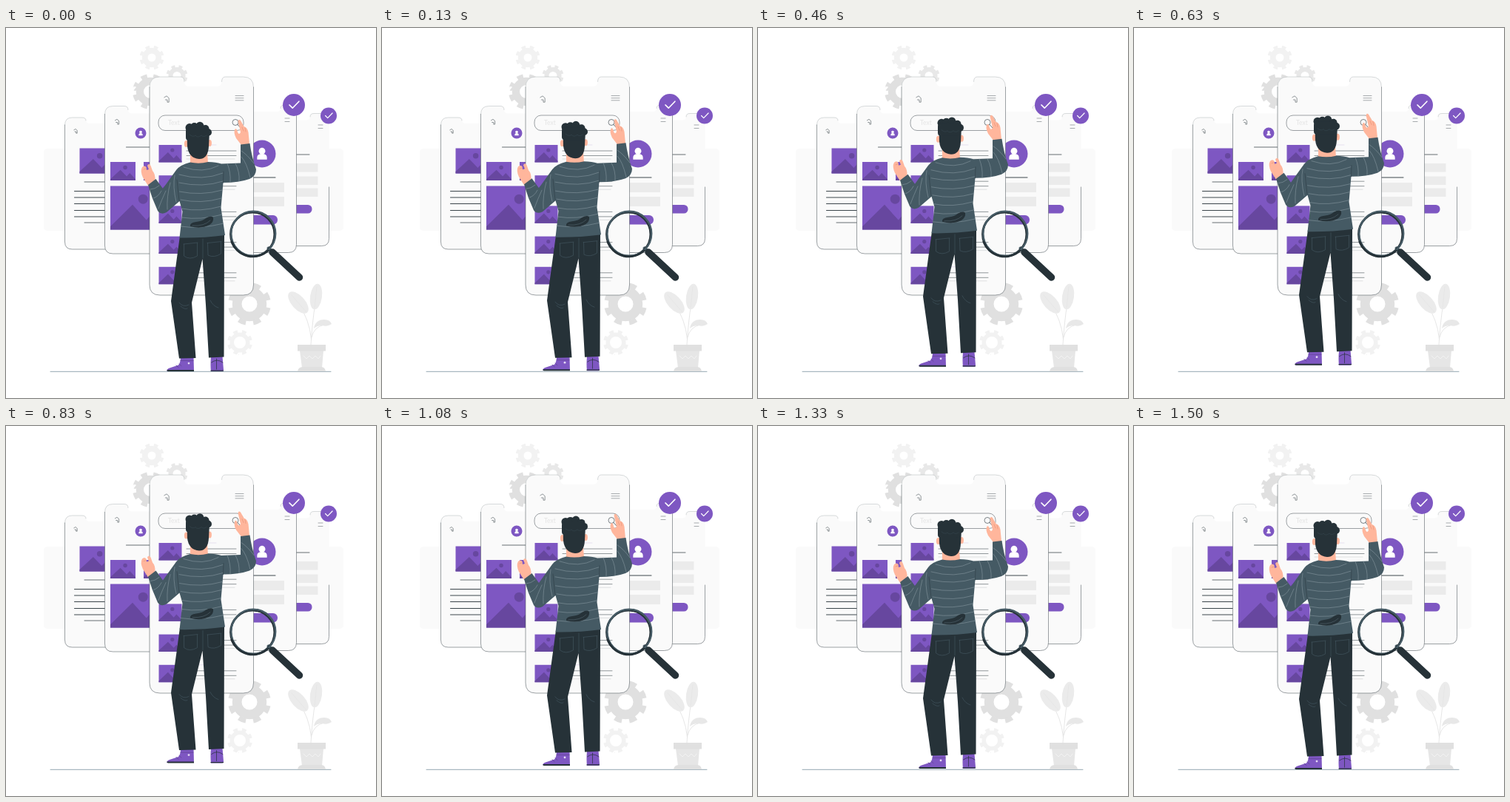
Write an HTML page that moves like this. It is 500x500 px and loops after 1540 ms.

```html
<!DOCTYPE html>
<html lang="en">
<head>
<meta charset="utf-8">
<style>
  html, body { margin: 0; width: 100%; height: 100%; overflow: hidden; background: #fff; }
  svg { display: block; width: 100%; height: 100%; }
</style>
</head>
<body>
<svg id="stage" viewBox="0 0 500 500"></svg>
<script>
const DARK = '#263238', SLATE = '#455a64', PURPLE = '#7e57c2', SHADE = '#67479f', SKIN = '#ffb69c';
const LOOP = 1540;

const path = (d, fill, extra = '') => `<path d="${d}" fill="${fill}" ${extra}/>`;
const line = (d, color = DARK, width = .7) =>
  path(d, 'none', `stroke="${color}" stroke-width="${width}" stroke-linecap="round" stroke-linejoin="round"`);
const rect = (x, y, w, h, fill, r = 0) =>
  `<rect x="${x}" y="${y}" width="${w}" height="${h}" rx="${r}" fill="${fill}"/>`;
const circle = (x, y, r, fill, extra = '') => `<circle cx="${x}" cy="${y}" r="${r}" fill="${fill}" ${extra}/>`;
const rows = (ys, x1, x2, color, width) => line(ys.map(y => `M${x1} ${y}H${x2}`).join(''), color, width);

function gear(x, y, r, hole, color, teeth = 8) {
  const tooth = r * .2, rim = r - tooth, mid = (rim + hole) / 2;
  return circle(x, y, mid, 'none', `stroke="${color}" stroke-width="${rim - hole}"`) +
    circle(x, y, r - tooth / 2 - .5, 'none',
      `stroke="${color}" stroke-width="${tooth + 1}" pathLength="${teeth * 2}" stroke-dasharray="1" transform="rotate(11 ${x} ${y})"`);
}

// Phone body with a notch in the top edge between n1 and n2; the outline leaves the notch open
function phone(x1, x2, top, bottom, n1, n2, depth, r, edgeTop = top + r) {
  const low = top + depth, mid = top + depth / 2;
  const left = `M${n1} ${mid}Q${n1} ${top} ${n1 - 5} ${top}H${x1 + r}Q${x1} ${top} ${x1} ${top + r}`;
  const base = `V${bottom - r}Q${x1} ${bottom} ${x1 + r} ${bottom}H${x2 - r}Q${x2} ${bottom} ${x2} ${bottom - r}`;
  const right = `Q${x2} ${top} ${x2 - r} ${top}H${n2 + 5}Q${n2} ${top} ${n2} ${mid}`;
  return path(`${left}${base}V${top + r}${right}Q${n2} ${low} ${n2 - 6} ${low}H${n1 + 6}Q${n1} ${low} ${n1} ${mid}Z`, '#fafafa') +
    line(left + right.replace(/^Q/, `M${x2} ${top + r}Q`), '#a9aeb1', .45) +
    line(`M${x1} ${top + r}${base}V${edgeTop}`, '#4b555a', .55);
}

// Picture placeholder: hills and a sun
function tile(x, y, w, h) {
  const at = (u, v) => `${x + w * u} ${y + h * v}`;
  return rect(x, y, w, h, PURPLE) + circle(x + w * .59, y + h * .3, Math.min(w, h) * .11, SHADE) +
    path(`M${at(0, 1)}V${y + h * .93}L${at(.4, .43)}L${at(.65, .78)}L${at(.77, .6)}L${at(1, .93)}V${y + h}Z`, SHADE);
}

function avatar(x, y, r) {
  return circle(x, y, r, PURPLE) + circle(x, y - r * .2, r * .24, '#fff') +
    path(`M${x - r * .36} ${y + r * .42}V${y + r * .25}Q${x - r * .34} ${y} ${x} ${y}
      Q${x + r * .34} ${y} ${x + r * .36} ${y + r * .25}V${y + r * .42}Z`, '#fff');
}

const badge = (x, y, r) => circle(x, y, r, PURPLE) +
  line(`M${x - r * .4} ${y}l${r * .28} ${r * .28}l${r * .58} ${-r * .6}`, '#fff', r * .11);
const home = (x, y, s) => line(`M${x - s} ${y - s}l${s} ${-s * .6}q${s} ${s * .7} ${s} ${s}V${y + s}h${-s * .7}v${-s}h${-s * .8}`, DARK, .5);

const scenery =
  rect(51, 163, 50, 111, '#fafafa', 5) + rect(410, 163, 46, 111, '#fafafa', 5) +
  gear(197, 40, 16.5, 5.5, '#f2f2f2') + gear(231, 64.5, 14.5, 5.5, '#e8e8e8') + gear(195, 86, 24, 9, '#e0e0e0') +
  gear(329, 373, 29, 10.5, '#e0e0e0') + gear(316, 425, 17, 8, '#f2f2f2') +
  line('M60 464.3H439', '#78909c', .8);

const leftPhones =
  phone(79.5, 170, 121, 299, 108, 150, 8, 10) + home(94, 140, 2.2) + tile(99.5, 162.5, 46, 34) +
  rows([208, 263], 106, 134) + rows([220.5, 229, 237.5, 246.5, 255], 92.5, 134, DARK, .9) +
  phone(133.5, 230, 105.5, 305, 165, 210, 10, 11) + home(150, 127.5, 2.6) + avatar(182, 142, 7.5) +
  rows([161], 162.5, 194) + tile(141, 181, 34, 25) + tile(186, 181, 34, 25) + tile(141, 213.5, 75, 59);

const rightPhones =
  phone(350, 436.5, 115.5, 294.5, 365, 411, 9, 10, 215) + rows([131, 135.5], 422, 428, DARK, .4) +
  rows([171], 392, 410) + [183, 200.5, 216.5].map(y => rect(380, y, 41.5, 11.5, '#ebebeb')).join('') +
  rect(370, 239, 43.5, 11.5, PURPLE, 5.5) +
  phone(300, 392.5, 104, 303.5, 310, 371, 9, 11) + rows([122, 126.5], 377, 383, DARK, .4) +
  avatar(346, 170, 18.5) + rows([202], 320, 364, DARK, .9) +
  rect(320, 209, 56, 13, '#ebebeb') + rect(320, 228, 56, 13, '#ebebeb') + rect(310, 253, 57, 12.5, PURPLE, 6) +
  badge(389, 104, 15) + badge(436, 118.5, 11);

const mainPhone =
  phone(194, 334.5, 66, 361, 241, 291.5, 13, 14) + home(217, 97, 3.2) + rows([91.5, 94.7, 97.8], 310, 321, DARK, .4) +
  `<rect x="206" y="118" width="115" height="20.5" rx="9" fill="#fafafa" stroke="#5b6468" stroke-width=".6"/>
  <text x="219" y="131" font-family="Lato, sans-serif" font-size="8.5" fill="#e4e4e4">Text</text>` +
  circle(310, 127.5, 4, 'none', `stroke="${DARK}" stroke-width=".6"`) + line('M313 130.5L317 135') +
  [158, 199.2, 240.4, 281.6, 322.8].map(y => tile(206.5, y, 31, 23.4) + rows([y], 246, 284, '#ddd6ea', .7) +
    rows([y + 8, y + 14.5], 244, 311, DARK, .5) + rows([y + 19], 244, 309, '#b0b5b8', .4)).join('');

const plant =
  line('M412 428Q414 396 418 372M412.5 420Q410 394 395 372M413 418Q416 404 430 401', '#e0e0e0', .8) +
  `<g fill="#ebebeb"><ellipse cx="395" cy="371" rx="9" ry="18" transform="rotate(-42 395 371)"/>
  <ellipse cx="419" cy="363" rx="8" ry="17.5" transform="rotate(8 419 363)"/></g>` +
  path('M416 406Q418 394 430 394Q438 394 440 400Q434 404 428 402Q420 402 416 406Z', '#e8e8e8') +
  line('M406 384L386 361M417 378L420 350', '#e0e0e0', .5) +
  path('M397 436H429L427 459H400Z', '#e6e6e6') + rect(394, 428, 38, 8.5, '#e0e0e0') +
  path('M394 464Q395 458 401 458H426Q431 458 432 464Z', '#e0e0e0') +
  line('M402 443l4 4 4-4 4 4 4-4 4 4 3-4', '#f5f5f5', .8);

const magnifier =
  line('M355 298L361 304', SLATE, 5) + line('M360 303L396.5 337', DARK, 9.5) +
  circle(333.3, 278.8, 29.7, 'none', `stroke="${DARK}" stroke-width="3"`) +
  circle(334.2, 277.8, 30, 'none', `stroke="${SLATE}" stroke-width="2.4"`) +
  line('M305 289A30.5 30.5 0 0 0 354 301', DARK, 3);

const shoes =
  path('M236 445H253.5L254 463.5H217.5Q217 461 221 459.5L233 455.5Q236 452 236 445Z', PURPLE) +
  path('M217.5 462Q217 464 219 464H254V462Z', DARK) + line('M236 449.5H253M230 456l3 2.5M234 454l3 2.5', SHADE, 1) +
  circle(247, 453, 1.4, '#e6dcf5') +
  path('M277 444H292.5L294 462Q294 464 291 464H277Q276 456 277 444Z', PURPLE) +
  line('M277 463H293.5', DARK, 1.3) + line('M284.5 447V461M277.5 452Q285 446 293 452', DARK, .7);

const trousers =
  path('M235 281L295 279L294.5 444.5L274 445.5L270 374L265.5 312L251 371L256.5 446L234 446.5L223 369Z', DARK) +
  line(`M240.5 292L240.5 308Q248 314 258.5 308V290.5M272.5 290.5L273 307Q281 311 290.5 305V289
    M240 292L259 290M272 290.5L291 288.5M234 371Q239 378 247 374M236 376Q242 381 245 379
    M276 368Q280 376 287 378M266 285V311`, SLATE, .6);

const stripes = `M240 188Q266 197 287 186M234 198Q265 207 293 196M234 209Q266 216 293 207M234.5 221Q264 227 292 219
  M236 232Q264 238 291 230M238 244Q262 249 290.5 241M238 256Q262 260 292 252M236 268Q262 272 294 264
  M299 183Q304 195 303 208M310 183Q316 194 315 207M318 174Q325 181 330 202M318 166Q326 171 335 183
  M195 218Q201 218 207 213M199 230Q206 228 210 220M206 244Q210 233 216 220M218 245Q217 228 222 209M230 235Q225 214 228 199`;

const man =
  shoes + trousers +
  path('M192 213L185 202Q181 193 184 188Q187 185 189.500 188L190 192L193 191L191 186Q193 182 195.500 186L198 193Q202 197 201.500 206Z', SKIN) +
  path('M318 158L311 149Q307 141 309.500 136.500Q312 135 313 141Q315 145 317 141L313.500 126Q314.500 122.500 317 125L321.500 133Q326 134 327.500 141L329 157Z', SKIN) +
  line('M186 191L189 190M319 134l2 5M323 135l1 5', '#e58f73', .6) +
  path('M249 168H272L273 183Q261 188 249 183Z', SKIN) +
  path(`M249 181.500Q261 184 273 181Q284 181 291 183.500L317 182.500L317 157.500L329.500 156Q332 174 338 191Q338 200 329 204
    Q315 209 293.500 209L290.500 243L296 280Q266 284 234.500 283.500L238.500 248L234.500 234L217 249Q209 253 205 247Q197 230 192 212
    L202.500 204L212 217L230 192Q235 185 249 181.500Z`, SLATE) +
  line(stripes, '#93a3aa', .5) + line('M234 233L231 205M293.500 209L294 194', '#34454d', .8) +
  path('M249 268Q248 263 257 262Q266 261 270 257Q277 253 280 256Q281 262 275 266Q264 272 249 268Z', DARK) +
  line('M252 267Q268 268 276 260', '#5d717a', .5) +
  `<g fill="${SKIN}"><ellipse cx="243.500" cy="156.500" rx="2.600" ry="4.500"/><ellipse cx="275.300" cy="155.500" rx="2.600" ry="4.500"/></g>` +
  path('M244.500 140H275L274 160Q273 177 261 177Q247 176 245 160Z', DARK) +
  circle(248, 134.5, 5.5, DARK) + circle(254.5, 133, 5, DARK) + circle(262, 132, 5.3, DARK) + circle(269.5, 136, 5, DARK) +
  circle(273, 141, 5, DARK) + rect(243, 135, 29, 17, DARK, 4) +
  line('M248 144q5 4 8 1q3 4 8 0q3 3 7 0', '#37474f', .6);

document.getElementById('stage').innerHTML =
  scenery + rightPhones + leftPhones + mainPhone + plant + magnifier + `<g id="man">${man}</g>`;

const figure = document.getElementById('man');
function draw() {
  const phase = 2 * Math.PI * (performance.now() + 30) / LOOP;
  figure.setAttribute('transform', `translate(0 ${4.4 * (Math.cos(phase) - .98)})`);
  requestAnimationFrame(draw);
}
draw();
</script>
</body>
</html>
```
